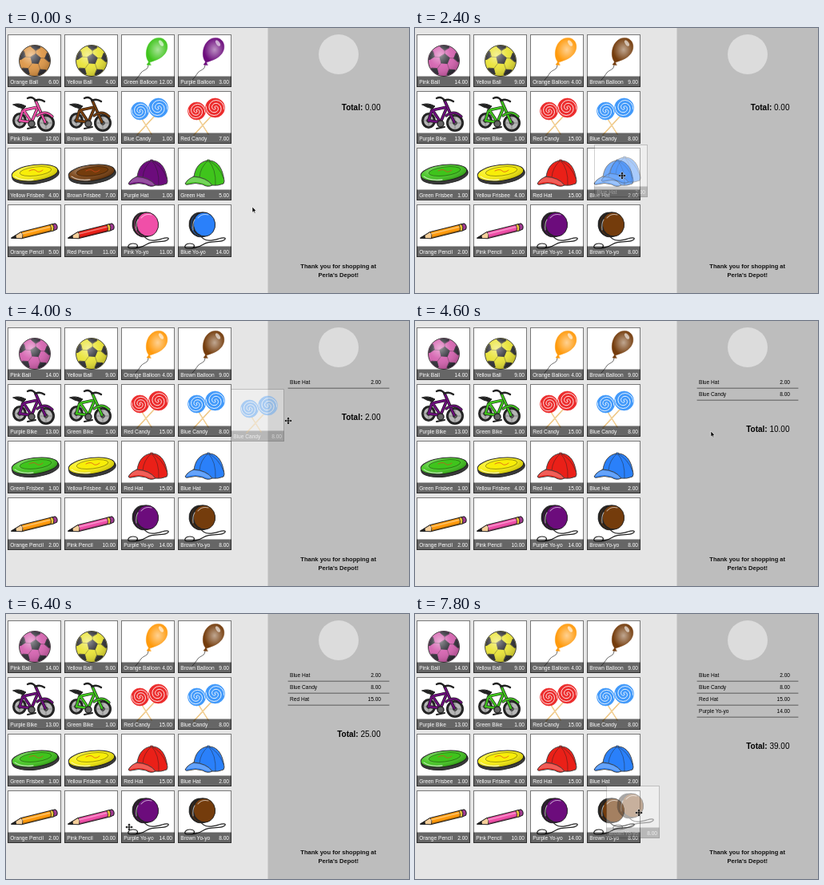
An HTML page that plays this animation: 504 px wide and 332 px high, repeating every 8000 ms.

```html
<!DOCTYPE html>
<html lang="en">
<head>
<meta charset="utf-8">
<title>Toy shop</title>
<style>
html, body { margin: 0; width: 100%; height: 100%; overflow: hidden; background: #e5e5e5; }
svg { display: block; width: 504px; height: 332px; font-family: "Liberation Sans", Arial, sans-serif; }
.label { font-size: 6.6px; fill: #fff; }
.row { font-size: 6.6px; fill: #000; }
.total { font-size: 10px; fill: #000; }
.thanks { font-size: 7.56px; font-weight: bold; fill: #111; text-anchor: middle; }
.end { text-anchor: end; }
</style>
</head>
<body>
<svg viewBox="0 0 504 332">
  <defs>
    <radialGradient id="shine" cx=".38" cy=".32" r=".7">
      <stop offset="0" stop-color="#fff" stop-opacity=".5"/>
      <stop offset=".5" stop-color="#fff" stop-opacity=".08"/>
      <stop offset="1" stop-color="#000" stop-opacity=".2"/>
    </radialGradient>
    <radialGradient id="glow" cx=".55" cy=".48" r=".5">
      <stop offset="0" stop-color="#fff" stop-opacity=".55"/>
      <stop offset="1" stop-color="#fff" stop-opacity="0"/>
    </radialGradient>
    <clipPath id="ballClip"><circle cx="34" cy="33" r="19"/></clipPath>
  </defs>
  <rect width="504" height="332" fill="#e5e5e5"/>
  <rect x="327.5" width="176.5" height="332" fill="#bdbdbd"/>
  <g id="before"></g>
  <g id="after"></g>
  <circle cx="416" cy="33" r="25" fill="#dcdcdc"/>
  <g id="bill"></g>
  <text class="thanks" x="415.7" y="300.5">Thank you for shopping at</text>
  <text class="thanks" x="415.7" y="311.6">Perla's Depot!</text>
  <g id="ghost"></g>
  <g id="cursor">
    <path id="arrow" d="M0 0V7.2L1.7 5.7L2.9 8.2L4 7.7L2.9 5.2H5Z" stroke="#fff" stroke-width=".6"/>
    <path id="move" d="M0-4.6L1.8-2.6H.6V-.6H2.6V-1.8L4.6 0L2.6 1.8V.6H.6V2.6H1.8L0 4.6L-1.8 2.6H-.6V.6H-2.6V1.8L-4.6 0L-2.6-1.8V-.6H-.6V-2.6H-1.8Z" stroke="#fff" stroke-width=".7" paint-order="stroke"/>
  </g>
</svg>
<script>
const $ = id => document.getElementById(id);
const LOOP = 8000;
const COLORS = {
  Orange: '#ff9a0c', Yellow: '#f8ee08', Green: '#3fc41c', Purple: '#6c0c7c', Pink: '#f04fa8',
  Brown: '#743c0c', Blue: '#2a80fa', Red: '#ea2018'
};
const BALLS = { Orange: '#dd9442', Yellow: '#e9e332', Pink: '#d45fae' };
const SWEETS = { Blue: '#4199fa', Red: '#ec2c2c' };

const parse = list => list.split('|').map(entry => {
  const [color, type, price] = entry.split(' ');
  return { color, type, price, name: color + ' ' + type };
});
const oldStock = parse('Orange Ball 6.00|Yellow Ball 4.00|Green Balloon 12.00|Purple Balloon 3.00|' +
  'Pink Bike 12.00|Brown Bike 15.00|Blue Candy 1.00|Red Candy 7.00|' +
  'Yellow Frisbee 4.00|Brown Frisbee 7.00|Purple Hat 1.00|Green Hat 5.00|' +
  'Orange Pencil 5.00|Red Pencil 11.00|Pink Yo-yo 11.00|Blue Yo-yo 14.00');
const newStock = parse('Pink Ball 14.00|Yellow Ball 9.00|Orange Balloon 4.00|Brown Balloon 9.00|' +
  'Purple Bike 13.00|Green Bike 1.00|Red Candy 15.00|Blue Candy 8.00|' +
  'Green Frisbee 1.00|Yellow Frisbee 4.00|Red Hat 15.00|Blue Hat 2.00|' +
  'Orange Pencil 2.00|Pink Pencil 10.00|Purple Yo-yo 14.00|Brown Yo-yo 8.00');
const HAT = 11, CANDY = 7, RED_HAT = 10, YOYO = 14, BROWN_YOYO = 15;
const basket = [HAT, CANDY, RED_HAT, YOYO].map(i => newStock[i]);

const path = (d, fill = 'none', stroke = '#222', width = 1) =>
  `<path d="${d}" fill="${fill}" stroke="${stroke}" stroke-width="${width}" stroke-linejoin="round" stroke-linecap="round"/>`;
const oval = (x, y, rx, ry, fill, stroke = 'none', width = 1, turn = 0) =>
  `<ellipse cx="${x}" cy="${y}" rx="${rx}" ry="${ry}" fill="${fill}" stroke="${stroke}" stroke-width="${width}" transform="rotate(${turn} ${x} ${y})"/>`;
const text = (x, y, cls, body) => `<text x="${x}" y="${y}" class="${cls}">${body}</text>`;

function pentagon(x, y, r, turn) {
  let d = '';
  for (let i = 0; i < 5; i++) {
    const a = turn + i * Math.PI * 0.4;
    d += (i ? 'L' : 'M') + (x + r * Math.cos(a)).toFixed(1) + ' ' + (y + r * Math.sin(a)).toFixed(1);
  }
  return path(d + 'Z', '#2b2b33', '#2b2b33', .8);
}

// a disc with two white spiral arms
function swirl(x, y, r, c) {
  let arms = '';
  for (const start of [0, Math.PI]) {
    arms += `M${x} ${y}`;
    for (let i = 1; i <= 24; i++) {
      const a = start + i * .4, q = (r - .5) * i / 24;
      arms += `L${(x + q * Math.cos(a)).toFixed(1)} ${(y + q * Math.sin(a)).toFixed(1)}`;
    }
  }
  return oval(x, y, r, r, c) + path(arms, 'none', 'rgba(255,255,255,.85)', 1) + oval(x, y, r, r, 'none', c, .6);
}

function wheel(x, y, rx, ry) {
  return oval(x, y, rx, ry, '#b5b5b5', '#222', 3) +
    path(`M${x - rx} ${y}H${x + rx}M${x} ${y - ry}V${y + ry}`, 'none', '#666', .6) +
    oval(x, y, 2.4, 2.4, '#666', '#222', .8);
}

const tube = (d, c, width) => path(d, 'none', '#222', width + 1.4) + path(d, 'none', c, width);

const draw = {
  Ball(c, color) {
    let spots = pentagon(35, 31, 6.5, -1.5), seams = '';
    for (let i = 0; i < 5; i++) {
      const a = -1.5 + i * Math.PI * .4, u = Math.cos(a), v = Math.sin(a);
      spots += pentagon(34 + 19 * u, 33 + 19 * v, 6, a + Math.PI);
      seams += `M${35 + 6 * u} ${31 + 6 * v}L${34 + 13 * u} ${33 + 13 * v}`;
    }
    return oval(34, 33, 19.5, 19.5, BALLS[color] || c) +
      `<g clip-path="url(#ballClip)">${path(seams, 'none', 'rgba(50,50,50,.6)', .7)}${spots}</g>` +
      oval(34, 33, 19.5, 19.5, 'url(#shine)', '#333', .9);
  },
  Balloon(c) {
    const skin = 'M35 35C28 28 31 9 43 5C54 2 60 11 57 20C54 29 43 33 35 35Z';
    return path('M34 38C34 45 28 44 25 48S22 53 18 57', 'none', '#444', .8) +
      path('M35 34L32 38L37 38.5Z', c, c, .5) + path(skin, c, c, .5) + path(skin, 'url(#glow)', 'none') +
      oval(50, 11, 2.2, 4.2, 'rgba(255,255,255,.6)', 'none', 1, -35);
  },
  Bike: c => wheel(15, 37, 7.5, 8.5) + wheel(48, 40, 9.5, 9.5) +
    tube('M15 37L19 24L38 20L30 39L15 37M20 24L30 39', c, 2.4) +
    tube('M35 12L47 39', c, 2.4) + tube('M37 31Q47 23 56 32', c, 1.8) +
    path('M7 17Q14 14 23 19L20 22Q13 21 7 17ZM17 20L19 24', '#222') +
    path('M25 9Q31 6 35 12Q40 9 46 13', 'none', '#222', 2.4) +
    oval(30, 41, 4, 4, '#666', '#222', 1.4) + path('M25 47L35 45', 'none', '#222', 2),
  Candy(c, color) {
    const sticks = 'M26 35L38 54M41 32L20 55', sweet = SWEETS[color];
    return path(sticks, 'none', '#e6b566', 1.4) + path(sticks, 'none', '#ffe7bb', .6) +
      swirl(23.5, 25, 11, sweet) + swirl(46.5, 21, 12, sweet);
  },
  Frisbee: c => oval(35, 34, 29.5, 11, '#3a3a3a', '#222', 1, -7) +
    oval(34, 31.5, 29, 10, c, '#222', 1, -7) + oval(34, 31.5, 29, 10, 'url(#shine)', 'none', 1, -7) +
    oval(35, 29.5, 20, 5.5, c, 'rgba(0,0,0,.5)', .7, -7) +
    path('M27 29Q33 26 36 29T44 28', 'none', 'rgba(220,70,30,.8)', .9) +
    path('M9 36Q18 42 32 40', 'none', 'rgba(255,255,255,.6)', 1.3),
  Hat: c => path('M20 37C21 26 27 17 38 16C50 16 56 26 58 42L57 45Q50 48 43 47Q34 38 20 37Z', c, '#444', 1) +
    path('M38 16Q28 24 27 37M38 16Q48 26 47 47M38 16Q51 22 57 38', 'none', 'rgba(30,30,30,.55)', .8) +
    path('M20 36Q12 39 9 45Q10 47 13 46Q22 43 31 46Q37 50 43 47Q36 37 20 36Z', c, '#444', 1) +
    path('M20 37Q13 39 10 45Q22 41 32 45Q38 48 42 46.5Q35 38 20 37Z', 'rgba(255,255,255,.28)', 'none') +
    oval(38, 16, 2, 1, c, '#444', .7),
  Pencil: c => path('M5 42L17 34.5L55 25L59.5 24.2Q63 26 61.5 31L57 33L18.5 42.5Z', c, '#222', 1.2) +
    path('M5 42L17 34.5Q20 38 18.5 42.5Z', '#f5cf9a', '#222', .8) + path('M5 42L10 39L10.5 42.3Z', '#222') +
    path('M18 37L56 27.5', 'none', 'rgba(255,255,255,.4)', 1.3) +
    path('M19 41.5L57 32', 'none', 'rgba(0,0,0,.3)', 1.3) +
    path('M53 25.5L56.5 24.7Q59 28 57.5 32.8L54 33.7Q55.5 30 53 25.5Z', '#e8c23a', '#222', .8) +
    path('M56.5 24.7L59.5 24.2Q63 26 61.5 31L57.5 32.8Q59 28 56.5 24.7Z', '#a33c94', '#222', .8),
  'Yo-yo': c => path('M28 39C34 48 44 45 51 43S62 42 57 45S40 45 32 50S18 55 12 55S9 49 15 49S22 53 18 55', 'none', '#222', 1.2) +
    oval(28, 25.5, 14, 15.5, '#222', '#222', .8, -8) + oval(29.5, 25.5, 13.5, 15, c, '#222', .8, -8) +
    oval(31.5, 25, 14, 15.2, '#222', '#222', .8, -8) + oval(33, 25, 13.6, 15, c, '#222', .9, -8) +
    path('M25 17Q30 11 38 13M21 19Q18 24 19 32', 'none', 'rgba(255,255,255,.6)', 1.1)
};

const picture = item => draw[item.type](COLORS[item.color], item.color);
const frame = () => '<rect x=".5" y=".5" width="66" height="65" fill="#fff" stroke="#777"/>';
const caption = item => '<rect y="52.5" width="67" height="13.5" fill="rgba(0,0,0,.6)"/>' +
  text(3.2, 61.6, 'label', item.name) + text(64, 61.6, 'label end', item.price);
const spot = i => [2 + i % 4 * 71, 8 + (i >> 2) * 71];
const shelf = stock => stock.map((item, i) =>
  `<g transform="translate(${spot(i)})">${frame()}${picture(item)}${caption(item)}</g>`).join('');

function bill(count) {
  let out = '', sum = 0;
  for (let i = 0; i < count; i++) {
    const { name, price } = basket[i], y = 79.2 + i * 15;
    sum += +price;
    out += text(355, y, 'row', name) + text(469, y, 'row end', price) +
      path(`M353 ${y + 5}H479`, 'none', '#444', .8);
  }
  const y = count ? 109 + count * 15 : 102.8;
  return out + text(468.5, y, 'total end', `<tspan font-weight="bold">Total:</tspan> ${sum.toFixed(2)}`);
}

function dragged(i, dx, dy) {
  const [x, y] = spot(i), over = x + dx > 327;
  return `<g transform="translate(${x + dx} ${y + dy})"><g opacity=".35">${frame()}${caption(newStock[i])}</g>` +
    `<g opacity="${over ? .6 : .4}">${picture(newStock[i])}</g></g>`;
}

// time, pointer x, y, shape, basket rows, dragged item, its offset
const steps = [
  [0, 308, 224, 'arrow', 0],
  [1400, 260, 195, 'move', 0],
  [1600, 255, 192, 'move', 0],
  [1800, 251, 190, 'move', 0],
  [1990, 250, 189, 'move', 0],
  [2400, 259, 185, 'move', 0, HAT, 9, -4],
  [2600, 325, 159, 'move', 0, HAT, 75, -30],
  [2800, 383, 133, 'move', 0, HAT, 133, -56],
  [3000, 392, 130, 'move', 0, HAT, 142, -59],
  [3200, 392, 130, 'arrow', 1],
  [3400, 330, 128, 'arrow', 1],
  [3600, 240, 118, 'move', 1],
  [3800, 262, 119, 'move', 1, CANDY, 10, 1],
  [4000, 353, 125, 'move', 1, CANDY, 66, 6],
  [4200, 388, 135, 'move', 1, CANDY, 138, 16],
  [4400, 388, 135, 'arrow', 2],
  [4600, 370, 138, 'arrow', 2],
  [4800, 230, 166, 'move', 2],
  [5000, 189, 171, 'move', 2, RED_HAT, 2, -1],
  [5200, 307, 160, 'move', 2, RED_HAT, 120, -12],
  [5400, 426, 147, 'move', 2, RED_HAT, 239, -25],
  [5600, 426, 150, 'arrow', 3],
  [5800, 390, 170, 'arrow', 3],
  [6000, 230, 235, 'move', 3],
  [6200, 133, 262, 'move', 3],
  [6400, 154, 267, 'move', 3],
  [6600, 255, 227, 'move', 3, YOYO, 100, -40],
  [6800, 371, 192, 'move', 3, YOYO, 216, -75],
  [7000, 375, 193, 'arrow', 4],
  [7200, 318, 222, 'arrow', 4],
  [7400, 250, 253, 'move', 4],
  [7600, 263, 253, 'move', 4, BROWN_YOYO, 7, -6],
  [7800, 280, 249, 'move', 4, BROWN_YOYO, 24, -6]
];

$('before').innerHTML = shelf(oldStock);
$('after').innerHTML = shelf(newStock);

const show = (id, on) => $(id).style.display = on ? '' : 'none';
let last;

function tick() {
  const t = performance.now() % LOOP;
  show('before', t < 600);
  show('after', t >= 600);
  const step = steps.findLast(s => s[0] <= t);
  if (step !== last) {
    const [, x, y, shape, rows, item, dx, dy] = last = step;
    $('bill').innerHTML = bill(rows);
    $('ghost').innerHTML = item === undefined ? '' : dragged(item, dx, dy);
    $('cursor').setAttribute('transform', `translate(${x} ${y})`);
    show('arrow', shape === 'arrow');
    show('move', shape === 'move');
  }
  requestAnimationFrame(tick);
}
tick();
</script>
</body>
</html>
```
